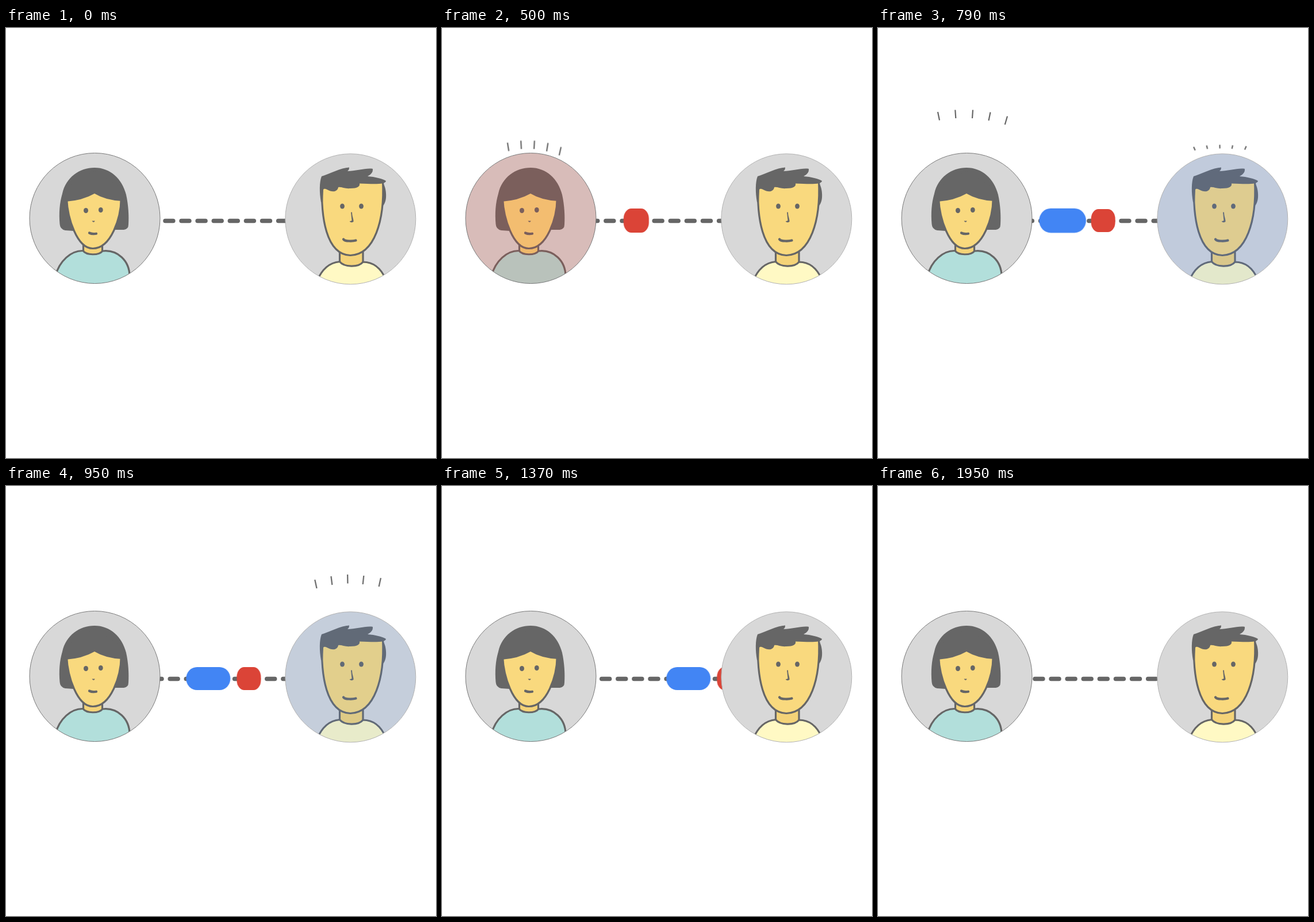
Animation, 748 px wide and 748 px high, one loop 2000 ms. Source, as an HTML page without scripts:

```html
<!DOCTYPE html>
<html lang="en">
<head>
<meta charset="utf-8">
<title>Two people, one line</title>
<style>
  html, body { margin: 0; width: 100%; height: 100%; overflow: hidden; background: #fff; }
  svg { display: block; width: 100%; height: 100%; }

  .ink { fill: #666; }
  .skin { fill: #f9d97e; }
  .neck { fill: #f4d378; }
  .edge { stroke: #666; stroke-width: 3.2; stroke-linejoin: round; }
  .mouth { fill: none; stroke: #666; stroke-width: 4.2; stroke-linecap: round; }

  /* 24 ticks per second, 48 ticks per loop */
  .dashes, .slide { animation: 2s steps(48) -10ms infinite; }
  .dashes {
    stroke: #666; stroke-width: 7.6; stroke-linecap: round;
    stroke-dasharray: 13.8 14.3; animation-name: flow;
  }
  .slide { animation-name: slide; }
  .pop, .rays, .tint { animation: 2s step-end -10ms infinite; }
  .pop { animation-name: pop; transform-box: fill-box; transform-origin: center; }
  .rays { animation-name: rise; fill: none; stroke: #666; stroke-width: 2.2; }
  .rays path { vector-effect: non-scaling-stroke; }
  .tint { animation-name: tint; }
  /* the second signal follows eight ticks later */
  .late { animation-delay: -1.67667s; }

  @keyframes flow { from { stroke-dashoffset: -20.8; } to { stroke-dashoffset: -389.8; } }
  @keyframes slide { to { transform: translateX(369px); } }
  @keyframes pop {
    0% { transform: scale(0); }
    16.667% { transform: scale(.3); }
    18.75% { transform: scale(.7); }
    20.833% { transform: scale(.98); }
    22.917% { transform: scale(1.06); }
    25% { transform: scale(1.05); }
    27.083% { transform: scale(1.03); }
    29.167% { transform: scale(1.01); }
    31.25% { transform: scale(1); }
    83.333%, 100% { transform: scale(0); }
  }
  @keyframes rise {
    0% { opacity: 0; transform: none; }
    22.917% { opacity: 1; transform: translateY(62px) scale(.75, .4); }
    25% { opacity: 1; transform: translateY(53.5px) scale(.77, 1); }
    27.083% { opacity: 1; transform: translateY(35px) scale(.85, 1); }
    29.167% { opacity: 1; transform: translateY(22px) scale(.91, 1); }
    31.25% { opacity: 1; transform: translateY(14px) scale(.94, 1); }
    33.333% { opacity: 1; transform: translateY(8px) scale(.97, 1); }
    35.417% { opacity: 1; transform: translateY(4px) scale(.98, 1); }
    37.5% { opacity: 1; transform: translateY(1px); }
    39.583% { opacity: 1; transform: none; }
    41.667% { opacity: 1; transform: translateY(-1px); }
    43.75% { opacity: .5; transform: translateY(-1px); }
    45.833%, 100% { opacity: 0; transform: none; }
  }
  @keyframes tint {
    0% { opacity: 0; }
    18.75% { opacity: .05; }
    20.833% { opacity: .1; }
    22.917% { opacity: .15; }
    25% { opacity: .19; }
    27.083% { opacity: .19; }
    29.167% { opacity: .16; }
    31.25% { opacity: .12; }
    33.333% { opacity: .08; }
    35.417% { opacity: .04; }
    37.5%, 100% { opacity: 0; }
  }
</style>
</head>
<body>
<svg viewBox="0 0 748 748">
  <defs>
    <clipPath id="left"><circle cx="154.5" cy="331" r="113.5"/></clipPath>
    <clipPath id="right"><circle cx="599.3" cy="332.3" r="113.5"/></clipPath>
  </defs>

  <!-- line and signals -->
  <path class="dashes" d="M200 335.5H560"/>
  <g class="slide"><rect class="pop" x="224.6" y="315" width="42" height="40" rx="13" ry="17" fill="#db4437"/></g>
  <g class="slide"><rect class="pop late" x="136.5" y="315" width="77" height="40" rx="19" ry="20" fill="#4285f4"/></g>

  <!-- woman -->
  <g clip-path="url(#left)">
    <circle cx="154.5" cy="331" r="113.5" fill="#d8d8d8"/>
    <path class="ink" d="M154 243C181 243 202 262 209 290C213 308 214 328 213 342Q213 350 205 351L186 351L118 353L103 352Q94 350 93.5 341C92 322 93 305 98 288C104 260 128 243 154 243Z"/>
    <path class="neck edge" d="M134.5 372V396H167.5V372Z"/>
    <path class="edge" fill="#b2dfdb" d="M86 431C93 405 113 387 134 387.5C140 395.5 161 396 168 388C194 385 215 405 215 432V456H86Z"/>
    <path class="skin edge" d="M105.4 296C107 330 123 383.5 151 383.5C183 383.5 200 330 200.3 296L154 280Z"/>
    <path class="ink" d="M104 302Q133 300 154 288Q174 300 202 301L205 280L154 248L103 278Z"/>
    <ellipse class="ink" cx="139" cy="317.5" rx="4" ry="4.6"/>
    <ellipse class="ink" cx="164.8" cy="316.5" rx="3.9" ry="4.6"/>
    <path class="ink" d="M149.5 335.5H154.8Q152.5 340 149.5 335.5Z"/>
    <path class="mouth" d="M145 356.5Q150 359 157 357.7"/>
    <circle class="tint" cx="154.5" cy="331" r="113.5" fill="#db4437"/>
  </g>
  <circle cx="154.5" cy="331" r="113.5" fill="none" stroke="#777"/>

  <!-- man -->
  <g clip-path="url(#right)">
    <circle cx="599.3" cy="332.3" r="113.5" fill="#d8d8d8"/>
    <path class="ink" d="M652 266C660 270 663 290 660 301Q658 308 654 311Z"/>
    <path class="neck edge" d="M580.5 384V416H621V384Z"/>
    <path class="edge" fill="#fff9c4" d="M541 440C549 421 562 408 580.5 406.5C588 416 613 417 621 407C640 407 653 419 661 438V460H541Z"/>
    <path class="skin edge" d="M550 266C547 330 557 394 599 395.5C641 394 659 335 655.5 266Z"/>
    <path class="ink" d="M548 303C545 286 545 268 549 258C562 254 583 243 597 242.5Q597 247 594 249C608 249 627 243 638 245Q639 253 629 258C642 259 655 262 661 266C660 272 645 272 615 270.5C616 276 611 279 599 279C590 280 583 276 578 277C577 284 570 285.5 564 283.5C558 281 554 278 552 281L551 303Z"/>
    <ellipse class="ink" cx="585" cy="310" rx="3.9" ry="4.6"/>
    <ellipse class="ink" cx="618" cy="310" rx="3.9" ry="4.6"/>
    <path class="ink" d="M600 320.5H602C602 328 605 333 604.5 337Q601 339.5 597.5 336.5L601.5 335Z"/>
    <path class="mouth" d="M587 367.5Q589 370.5 597 370.5Q604 370.8 608.5 369.5"/>
    <circle class="tint late" cx="599.3" cy="332.3" r="113.5" fill="#4285f4"/>
  </g>
  <circle cx="599.3" cy="332.3" r="113.5" fill="none" stroke="#b0b0b0"/>

  <!-- rays -->
  <g class="rays" style="transform-origin: 147px 142px">
    <path d="M104 146L107 160.5M134.3 142.5L135.3 157M165 142.5L164 157M195.5 146.5L192.5 161M225 153.5L220.8 168"/>
  </g>
  <g class="rays late" style="transform-origin: 596px 142px">
    <path d="M533.5 149L537 164M563.5 143L565.5 158M594 140L594.3 155.5M624 142L622.3 157M655.5 146L652 161"/>
  </g>
</svg>
</body>
</html>
```
